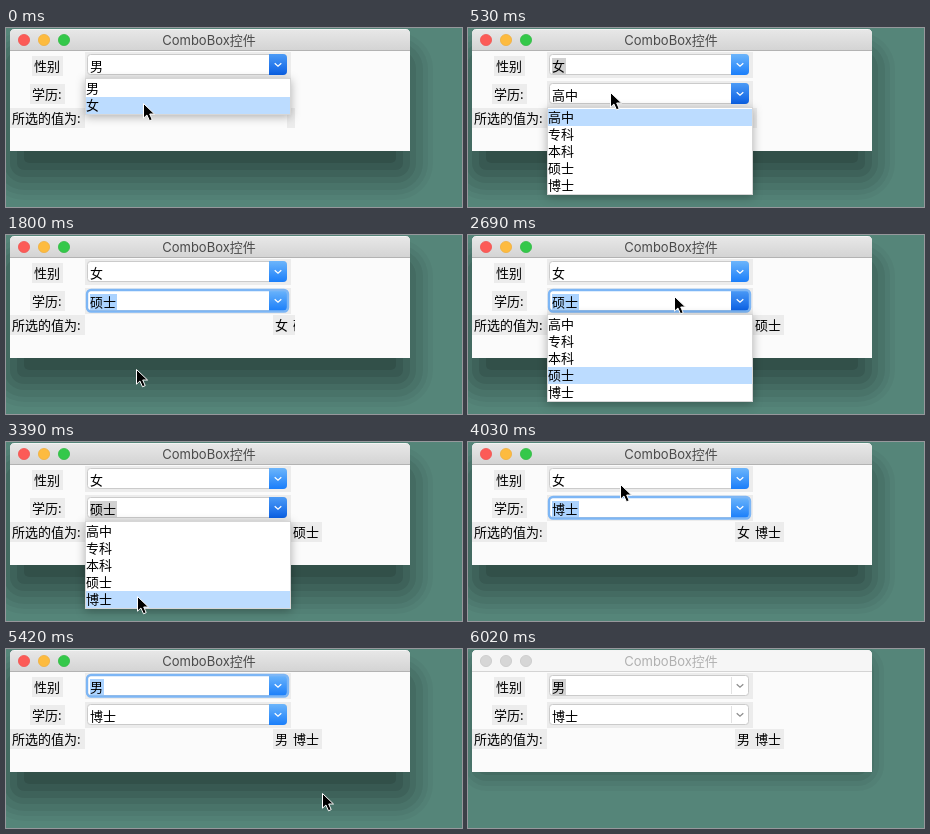
Recreate the animation shown at these times as an HTML page. Size 456 by 179 pixels, loop 6080 ms.

```html
<!DOCTYPE html>
<html lang="zh">
<head>
<meta charset="utf-8">
<style>
html, body { margin: 0; width: 456px; height: 179px; overflow: hidden; background: #558579; }
svg { display: block; }
text { font: 13px "Noto Sans CJK SC", "Noto Sans CJK", sans-serif; word-spacing: 2px; fill: #000; white-space: pre; }
.title { font-family: Inter, "Noto Sans CJK SC", "Noto Sans CJK", sans-serif; }
.popup { filter: drop-shadow(0 2px 5px rgba(0,0,0,.3)); }
</style>
</head>
<body>
<svg id="stage" width="456" height="179" viewBox="0 0 456 179">
  <defs>
    <linearGradient id="bar" x2="0" y2="1"><stop stop-color="#e8e8e8"/><stop offset="1" stop-color="#d4d4d4"/></linearGradient>
    <linearGradient id="blue" x2="0" y2="1"><stop stop-color="#6cb5fb"/><stop offset="1" stop-color="#1a7efa"/></linearGradient>
    <linearGradient id="pressed" x2="0" y2="1"><stop stop-color="#4c9bf6"/><stop offset="1" stop-color="#0b60e4"/></linearGradient>
  </defs>
  <g id="scene"></g>
</svg>
<script>
const LOOP = 6080;
const GENDERS = ['男', '女'];
const DEGREES = ['高中', '专科', '本科', '硕士', '博士'];
const scene = document.getElementById('scene');

// Pointer moves: start, end, number of steps, destination x, y.
const MOVES = [
  [240, 420, 4, 142, 64],
  [640, 820, 4, 138, 87],
  [870, 990, 3, 134, 98],
  [1160, 1680, 9, 130, 134],
  [2040, 2630, 10, 206, 61],
  [2750, 3270, 9, 134, 150],
  [3330, 3390, 2, 131, 154],
  [3560, 3910, 7, 150, 44],
  [3970, 4140, 4, 153, 40],
  [4260, 4430, 4, 152, 54],
  [4670, 4780, 3, 151, 56],
  [4960, 5250, 5, 212, 88],
  [5300, 5540, 5, 386, 182]
];

// State changes; each one keeps the earlier values it does not name.
const EVENTS = [
  [0, { gender: '男', degree: '高中', open: 1, picked: 0, focus: 0, result: '', labelX: 281, labelEnd: 289, active: true }],
  [60, { gender: '女', open: 0, picked: 1, focus: 1, result: '女 ', labelX: 267 }],
  [470, { open: 2, focus: 0 }],
  [1800, { degree: '硕士', open: 0, picked: 2, focus: 2, result: '女 硕士' }],
  [1860, { labelEnd: 316 }],
  [2690, { open: 2 }],
  [2750, { focus: 0 }],
  [3500, { degree: '博士', open: 0, focus: 2, result: '女 博士' }],
  [4200, { open: 1, focus: 0 }],
  [4900, { gender: '男', open: 0, picked: 1, focus: 1, result: '男 博士' }],
  [6020, { active: false, focus: 0 }]
];

function pointerAt(t) {
  let x = 137, y = 75;
  for (const [start, end, steps, toX, toY] of MOVES) {
    if (t < start) break;
    const step = Math.floor((t - start) / (end - start) * (steps - 1) + 1e-6) + 1;
    const p = Math.min(1, step / steps);
    x += (toX - x) * p;
    y += (toY - y) * p;
  }
  return { x: Math.round(x), y: Math.round(y) };
}

function stateAt(t) {
  return Object.assign({}, ...EVENTS.filter(([at]) => at <= t).map(([, change]) => change));
}

const rect = (x, y, w, h, fill, extra = '') =>
  `<rect x="${x}" y="${y}" width="${w}" height="${h}" fill="${fill}" ${extra}/>`;
const text = (x, y, str, extra = '') => `<text x="${x}" y="${y}" ${extra}>${str}</text>`;

// Nested layers that grow denser towards the middle.
function shadow(active) {
  const spreads = active ? [23, 18, 13, 6, 0, -7, -14] : [12, 7, 2, -4];
  const drop = active ? 26 : 7;
  return spreads.map((d, i) => rect(4 - d, 1 + drop - d, 400 + 2 * d, 122 + 2 * d, '#000',
    `opacity="${.035 + .012 * i}" rx="${Math.max(5, 14 + d)}"`)).join('');
}

function windowFrame(active) {
  const lights = active ? ['#fc5b57', '#fdbb3f', '#34c84a'] : ['#d6d6d6', '#d6d6d6', '#d6d6d6'];
  const edges = active ? ['#ef504d', '#efad38', '#2db840'] : ['#c4c4c4', '#c4c4c4', '#c4c4c4'];
  const top = 'V6Q4 1 9 1H399Q404 1 404 6V';
  return shadow(active) +
    `<path d="M4 123${top}123Z" fill="#fbfbfb"/>` +
    `<path d="M4 22${top}22Z" fill="${active ? 'url(#bar)' : '#f6f6f6'}"/>` +
    rect(8, 1, 392, 1, '#f5f5f5') +
    rect(4, 22, 400, 1, active ? '#b3b3b3' : '#d4d4d4') +
    lights.map((c, i) => `<circle cx="${18 + 20 * i}" cy="12" r="5.6" fill="${c}" stroke="${edges[i]}" stroke-width=".7"/>`).join('') +
    text(203, 17, 'ComboBox控件', `class="title" text-anchor="middle" style="fill:${active ? '#4a4a4a' : '#b0b0b0'}"`);
}

const label = (x, y, w, str, textX) => rect(x, y, w, 20, '#ececec') + text(textX, y + 15, str);

function combo(index, value, s) {
  const y = index === 1 ? 26 : 55;
  const focused = s.focus === index;
  const fill = s.open === index ? 'url(#pressed)' : 'url(#blue)';
  let out = rect(79, y - 2, 206, 26, '#ececec') +
    rect(81.5, y + .5, 199, 20, '#fff', 'rx="3" stroke="#cbcbcb"');
  out += s.active
    ? `<path d="M263 ${y}h14q4 0 4 4v13q0 4-4 4h-14z" fill="${fill}"/>`
    : rect(263, y + 2, 1, 17, '#e2e2e2');
  out += `<path d="M268.7 ${y + 9.2}l3.3 3.1 3.3-3.1" fill="none" stroke="${s.active ? '#fff' : '#8c8c8c'}" stroke-width="1.2"/>`;
  if (focused) out += rect(81, y, 201, 21.5, 'none', 'rx="4" stroke="#7db6f5" stroke-width="2.4"');
  if (s.picked === index)
    out += rect(84, y + 4, 13 * value.length + 1, 16, focused ? '#abd3ff' : '#d1d1d1');
  return out + text(84, y + 17, value);
}

function popup(s, pointer) {
  if (!s.open) return '';
  const items = s.open === 1 ? GENDERS : DEGREES;
  const top = s.open === 1 ? 50 : 79;
  const rowsTop = top + 2;
  const hovered = Math.floor((pointer.y - rowsTop) / 17);
  const current = items.indexOf(s.open === 1 ? s.gender : s.degree);
  const row = hovered >= 0 && hovered < items.length ? hovered : current;
  const height = items.length * 17 + 3;
  return `<g class="popup">` + rect(79, top, 206, height, '#fff') + '</g>' +
    rect(79.5, top + .5, 205, height - 1, 'none', 'stroke="#d6d6d6"') +
    rect(80, rowsTop + 17 * row, 204, 17, '#bcdcff') +
    items.map((item, i) => text(80, rowsTop + 13 + 17 * i, item)).join('');
}

function arrow({ x, y }) {
  return `<path transform="translate(${x + .5} ${y})" d="M0 .5V15.2L3.4 12 6 17.8 8.7 16.6 6.2 11H11Z" fill="#000" stroke="#fff"/>`;
}

function render(t) {
  const s = stateAt(t);
  const pointer = pointerAt(t);
  const width = s.labelEnd - s.labelX;
  scene.innerHTML = windowFrame(s.active) +
    label(26, 28, 31, '性别', 28) +
    label(24, 56, 35, '学历:', 26) +
    label(4, 80, 75, '所选的值为:', 6) +
    `<svg x="${s.labelX}" y="80" width="${width}" height="20">` + label(0, 0, width, s.result, 2) + '</svg>' +
    combo(1, s.gender, s) + combo(2, s.degree, s) + popup(s, pointer) +
    (s.active ? arrow(pointer) : '');
}

const begin = performance.now();
function tick() {
  render((performance.now() - begin) % LOOP);
  requestAnimationFrame(tick);
}
tick();
</script>
</body>
</html>
```
